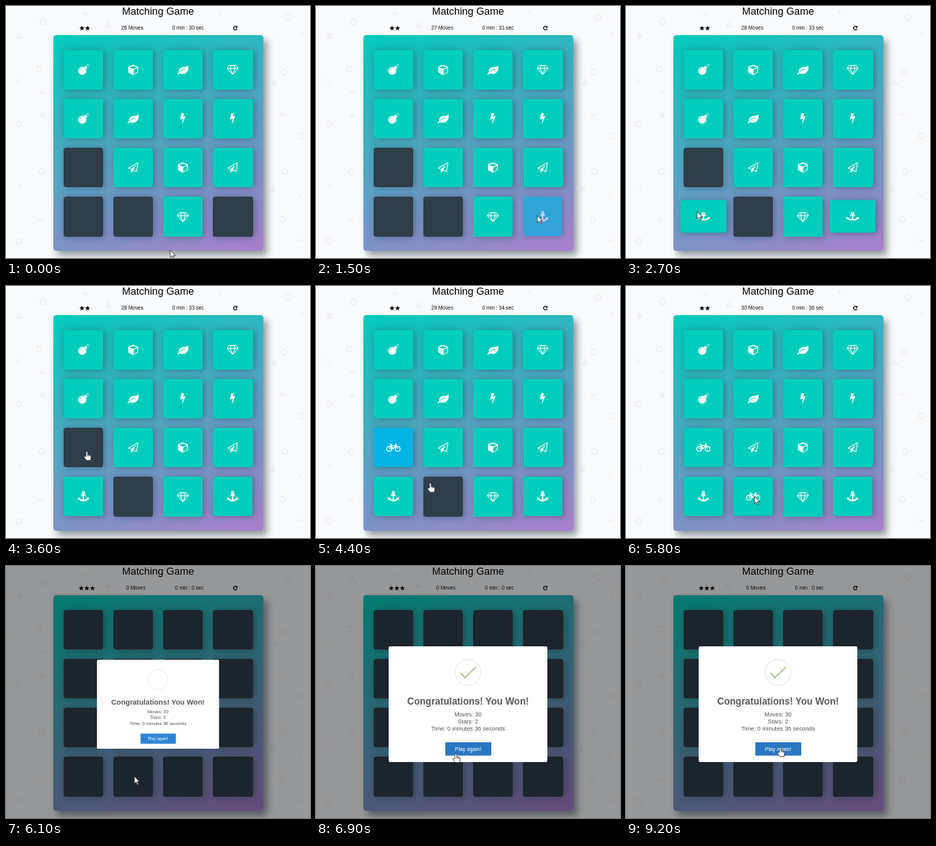
An HTML page for the animation above (9300 ms loop, 385x320 px).

```html
<!DOCTYPE html>
<html lang="en">
<head>
<meta charset="utf-8">
<title>Matching Game</title>
<style>
html, body { margin: 0; width: 100%; height: 100%; overflow: hidden; background: #fafbfc; }
#stage { position: absolute; left: 0; top: 0; width: 385px; height: 320px; overflow: hidden; }
.layer { position: absolute; left: 0; top: 0; width: 385px; height: 320px; }
text { font-family: "Liberation Sans", Arial, sans-serif; }
#deck {
  position: absolute; left: 60px; top: 37.3px; width: 266px; height: 273.7px; border-radius: 4px;
  background: linear-gradient(160deg, #02ccba 0%, #aa7ecd 100%);
  box-shadow: 4.8px 6px 8px 0 rgba(46, 61, 73, .5);
}
.card {
  position: absolute; width: 50.3px; height: 50.3px; border-radius: 3.2px; background: #2e3d49;
  box-shadow: 2px .8px 8px 0 rgba(46, 61, 73, .5);
}
.card svg { position: absolute; left: 15.15px; top: 15.15px; width: 20px; height: 20px; overflow: visible; }
#shade { position: absolute; inset: 0; background: rgba(0, 0, 0, .4); }
#modal {
  position: absolute; left: 92px; top: 102px; width: 201px; height: 147px;
  background: #fff; border-radius: 2px;
}
#modal svg { position: absolute; left: -92px; top: -102px; }
</style>
</head>
<body>
<svg width="0" height="0" style="position:absolute">
  <defs>
    <symbol id="bomb" viewBox="-10 -10 20 20">
      <circle cx="-1.5" cy="1.5" r="5.1" fill="#fff"/>
      <path d="M.6-3.8 2.6-5 5-2.6 3.8-.6Z" fill="#fff"/>
      <path d="M3.4-3.4Q4-5 5-4.6M5.6-7.2V-6M7.2-4.4H6M3.9-6.4l.7.7M6.9-6.5l-.8.8" fill="none" stroke="#fff" stroke-width=".8"/>
      <path d="M-4.8 1.1Q-4.5-1.4-1.9-1.8" fill="none" stroke="currentColor" stroke-width=".7"/>
    </symbol>
    <symbol id="cube" viewBox="-10 -10 20 20">
      <path fill="#fff" fill-rule="evenodd" d="M0-6.2 6.2-3.9V3.2L0 6.7-6.2 3.2V-3.9ZM.5 5.5 5.2 2.9V-1.9L.5-.1ZM0-1 5.2-2.9 0-4.8-5.2-2.9Z"/>
    </symbol>
    <symbol id="leaf" viewBox="-10 -10 20 20">
      <path fill="#fff" d="M6.8-5.6C7.6-1 6.4 3.6 1.6 5C-1.2 5.8-3 4.4-4.2 4.4C-5 4.4-5.4 6.2-6.2 6.2C-6.8 6.2-7.2 5.4-6.8 4.8C-6.2 4-5 3.4-5 2.8C-5.8 .4-4.6-2.2-1.4-3.1C1.6-3.9 4.4-3 6.8-5.6Z"/>
      <path d="M-4 2.7C-2 .4 0-.6 2.8-.8" fill="none" stroke="currentColor" stroke-width=".9"/>
    </symbol>
    <symbol id="gem" viewBox="-10 -10 20 20">
      <path fill="none" stroke="#fff" stroke-width="1" stroke-linejoin="round" d="M-4.2-5.6H4.2L7.1-1.8 0 6-7.1-1.8ZM-7.1-1.8H7.1M-1.3-5.6-3.1-1.8 0 6 3.1-1.8 1.3-5.6"/>
    </symbol>
    <symbol id="bolt" viewBox="-10 -10 20 20">
      <path fill="#fff" d="M3.3-2.4-.7 6.5-1.2 6.3 .2.1-3.1.9-3.4.5-1.9-6.5-1.5-6.7H1.4L1.6-6.2 .3-2.6 3.2-3.3Z"/>
    </symbol>
    <symbol id="plane" viewBox="-10 -10 20 20">
      <path fill="#fff" fill-rule="evenodd" d="M6.6-6.3 4.7 5.4 4.1 5.7.2 4-2.2 6.6-2.7 6.4V2.8L-6.3 1.3-6.4.6 6-6.6ZM3.9 4.5 5.5-5.3-5.1.9-2.6 1.9 3.8-2.9.2 3.1Z"/>
    </symbol>
    <symbol id="anchor" viewBox="-10 -10 20 20">
      <g fill="none" stroke="#fff" stroke-width="1.8">
        <circle cy="-4.7" r="1.4" stroke-width="1.3"/>
        <path d="M0-3.2V5.3M-2.8-1.5H2.8M-5.4 2.6Q-4.2 5.5 0 5.5T5.4 2.6"/>
      </g>
      <path fill="#fff" d="M-6.8 4.6V.9L-3.2 3ZM6.8 4.6V.9L3.2 3Z"/>
    </symbol>
    <symbol id="bike" viewBox="-10 -10 20 20">
      <g fill="none" stroke="#fff" stroke-width="1.1" stroke-linejoin="round">
        <circle cx="-5.3" cy="1.7" r="3.1"/><circle cx="5.3" cy="1.7" r="3.1"/>
        <path d="M-5.3 1.7-2.7-2.2H2.9L-.4 1.7ZM-.4 1.7-3.3-3.8M-4.7-3.9H-2M5.3 1.7 2.4-4.2H4.4"/>
      </g>
    </symbol>
    <path id="star" d="M0-3.1.9-1 3.1-.8 1.4.7 1.9 2.9 0 1.7-1.9 2.9-1.4.7-3.1-.8-.9-1Z"/>
  </defs>
</svg>

<div id="stage">
  <svg class="layer">
    <g id="pattern" fill="none" stroke="#eceef1" stroke-width="1.3"></g>
    <text x="192.6" y="11.3" font-size="12.9" text-anchor="middle">Matching Game</text>
    <g id="stars"><use href="#star"/><use href="#star"/><use href="#star"/></g>
    <g font-size="6.45" fill="#111">
      <text id="moves" y="30.4"></text>
      <text id="clock" x="250.6" y="30.4" text-anchor="end"></text>
    </g>
    <path d="M292.2 26.4A2.3 2.3 0 1 0 292.6 29" fill="none" stroke="#000" stroke-width="1.1"/>
    <path d="M293.2 25V27.8H290.4Z"/>
  </svg>
  <div id="deck"></div>
  <div id="cards"></div>
  <div id="shade"></div>
  <div id="modal">
    <svg class="layer" text-anchor="middle">
      <circle cx="192.5" cy="135" r="16.4" fill="none" stroke="#ededea" stroke-width="1.2"/>
      <g fill="none" stroke="#b8cca5" stroke-width="2.2" stroke-linecap="round">
        <path id="tip" d="M183.8 136.3 188.6 141.8" pathLength="1"/>
        <path id="long" d="M188.6 141.8 202.2 128.8" pathLength="1"/>
      </g>
      <text x="192.5" y="175.8" font-size="12" font-weight="700" fill="#595959">Congratulations! You Won!</text>
      <g font-size="7.5" fill="#545454">
        <text x="192.5" y="190.9">Moves: 30</text>
        <text x="192.5" y="200.1">Stars: 2</text>
        <text x="192.5" y="209.4">Time: 0 minutes 36 seconds</text>
      </g>
      <rect id="button" x="163.7" y="223.8" width="58.3" height="17" rx="1.2"/>
      <text x="192.7" y="234.8" font-size="6.8" fill="#fff">Play again!</text>
    </svg>
  </div>
  <svg class="layer">
    <g id="cursor" stroke="#222" stroke-width=".7" fill="#fff" stroke-linejoin="round">
      <path id="arrow" d="M0 0V9.4L2.2 7.4 3.8 11 5.3 10.4 3.7 6.9H6.7Z"/>
      <g id="hand">
        <path d="M-1.1 6.4V1A1.1 1.1 0 0 1 1.1 1V4.3L4.6 5.1Q5.8 5.4 5.6 7.2L4.9 11.6H-.4L-3.5 7.6Q-3.8 6.4-2.6 6.2Z"/>
        <path d="M1.1 4.3V6.4M2.7 4.7V6.6M4.2 5V6.8" fill="none" stroke-width=".5"/>
      </g>
    </g>
  </svg>
</div>

<script>
const LOOP = 9300, STEP = 100, WON = 6079;
const $ = id => document.getElementById(id);
const clamp = x => Math.min(1, Math.max(0, x));
const mix = (a, b, p) => a + (b - a) * p;

function bezier(x1, y1, x2, y2) {
  const at = (a, b, u) => 3 * a * u * (1 - u) ** 2 + 3 * b * u * u * (1 - u) + u ** 3;
  return x => {
    let lo = 0, hi = 1;
    for (let i = 0; i < 20; i++) {
      const mid = (lo + hi) / 2;
      if (at(x1, x2, mid) < x) lo = mid; else hi = mid;
    }
    return at(y1, y2, lo);
  };
}
const ease = bezier(.25, .1, .25, 1);
const easeInOut = bezier(.42, 0, .58, 1);

// keys: rows of [position, value, value...]
function track(keys, x, curve) {
  if (x <= keys[0][0]) return keys[0].slice(1);
  for (let i = 1; i < keys.length; i++) {
    const a = keys[i - 1], b = keys[i];
    if (x < b[0]) {
      const p = curve((x - a[0]) / (b[0] - a[0]));
      return a.slice(1).map((v, k) => mix(v, b[k + 1], p));
    }
  }
  return keys[keys.length - 1].slice(1);
}

const RUBBER = [[0, 1, 1], [.3, 1.25, .75], [.4, .75, 1.25], [.5, 1.15, .85], [.65, .95, 1.05], [.75, 1.05, .95], [1, 1, 1]];
const FLIP = [[0, 90, 0], [.4, -20, .7], [.6, 10, 1], [.8, -5, 1], [1, 0, 1]];
const POP = [[0, .7], [.45, 1.05], [.8, .95], [1, 1]];
const PATH = [
  [200, 208, 310], [1000, 284, 266], [1400, 284, 266], [2400, 90, 261], [2900, 90, 261],
  [3400, 102.3, 210], [3900, 102.3, 210], [4700, 162.5, 267], [6200, 162.5, 267],
  [6800, 177, 238], [7200, 177, 238], [7700, 195.3, 230.3]
];

const ICONS = "bomb cube leaf gem bomb leaf bolt bolt bike plane cube plane anchor bike gem anchor".split(" ");
const PLAYS = {
  15: { open: 1300, match: 2610 }, 12: { open: 2610, match: 2610 },
  8: { open: 3700, match: 5127 }, 13: { open: 5127, match: 5127 }
};
const CLICKS = Object.values(PLAYS).map(p => p.open);

const cards = ICONS.map((icon, i) => {
  const el = document.createElement("div");
  const x = 73 + 63.1 * (i % 4), y = 55.5 + 62.3 * Math.floor(i / 4);
  el.className = "card";
  el.style.left = x + "px";
  el.style.top = y + "px";
  el.innerHTML = `<svg><use href="#${icon}" width="20" height="20"/></svg>`;
  $("cards").append(el);
  return { el, x, y, svg: el.firstChild, play: PLAYS[i] || { open: -9999, match: -9999 } };
});

const SHAPES = {
  pent: "M0-4 4-1 2.5 3.5H-2.5L-4-1Z",
  ring: "M-3.5 0A3.5 3.5 0 1 1 3.5 0A3.5 3.5 0 1 1-3.5 0",
  tri: "M-3 2.5 0-3 3 2.5Z",
  dash: "M-2-2.5 2 2.5",
  wave: "M-3 1Q-1.5-3 0 0T3-1"
};
const SPOTS = {
  pent: [47, 20, 45, 210, 16, 298, 357, 14, 353, 210],
  ring: [42, 80, 352, 84, 16, 150, 374, 165, 350, 271],
  tri: [17, 38, 46, 138, 340, 97, 337, 232, 130, 24],
  dash: [15, 95, 18, 228, 375, 35, 372, 240, 270, 9],
  wave: [46, 110, 44, 272, 350, 138, 373, 298, 100, 10]
};
for (const kind in SPOTS)
  for (let i = 0; i < SPOTS[kind].length; i += 2)
    $("pattern").innerHTML += `<path d="${SHAPES[kind]}" transform="translate(${SPOTS[kind][i]} ${SPOTS[kind][i + 1]})"/>`;

const show = (el, on) => { el.style.display = on ? "" : "none"; };
const inside = (x, y, left, top, w, h) => x >= left && x <= left + w && y >= top && y <= top + h;

function drawCard(card, t, won) {
  const { open, match } = card.play, isOpen = !won && t >= open, isMatch = !won && t >= match;
  let sx = 1, sy = 1, alpha = 1;
  if (isMatch) [sx, sy] = track(RUBBER, (t - match) / 750, ease);
  else if (isOpen) {
    const [deg, a] = track(FLIP, (t - open) / 750, ease);
    sx = Math.cos(deg * Math.PI / 180);
    alpha = a;
  }
  const fill = isMatch ? "#02ccba" : isOpen ? "#02b3e4" : "#2e3d49";
  const s = card.el.style;
  s.background = s.color = fill;
  s.opacity = alpha;
  s.transform = `scale(${sx}, ${sy})`;
  show(card.svg, isOpen);
  return isOpen;
}

function drawStroke(el, p) {
  show(el, p > 0);
  el.style.strokeDasharray = `${p} 2`;
}

function draw(t) {
  const won = t >= WON;
  const [x, y] = track(PATH, t, easeInOut);

  let overClosed = false;
  for (const card of cards) {
    const isOpen = drawCard(card, t, won);
    if (!won && !isOpen && inside(x, y, card.x, card.y, 50, 50)) overClosed = true;
  }

  const count = won ? 0 : 26 + CLICKS.filter(c => t >= c).length;
  $("moves").textContent = count + " Moves";
  $("moves").setAttribute("x", won ? 152.3 : 146);
  $("clock").textContent = `0 min : ${won ? 0 : 30 + Math.floor((t + 350) / 1000)} sec`;
  [...$("stars").children].forEach((star, i) => {
    star.setAttribute("transform", `translate(${(won ? 95.3 : 96.2) + 7.1 * i} 28)`);
    show(star, won || i < 2);
  });

  show($("shade"), won);
  show($("modal"), won);
  const since = t - WON;
  $("modal").style.transform = `scale(${track(POP, since / 300, ease)[0]})`;
  drawStroke($("tip"), clamp((since - 400) / 120));
  drawStroke($("long"), clamp((since - 490) / 150));

  const hover = won && inside(x, y, 163.7, 223.8, 58.3, 17);
  $("button").setAttribute("fill", hover ? "#2977c2" : "#3085d6");
  $("cursor").setAttribute("transform", `translate(${x} ${y})`);
  show($("hand"), hover || overClosed);
  show($("arrow"), !hover && !overClosed);
}

const start = performance.now();
function tick() {
  const t = (performance.now() - start) % LOOP;
  draw(Math.floor(t / STEP) * STEP);
  requestAnimationFrame(tick);
}
tick();
</script>
</body>
</html>
```
